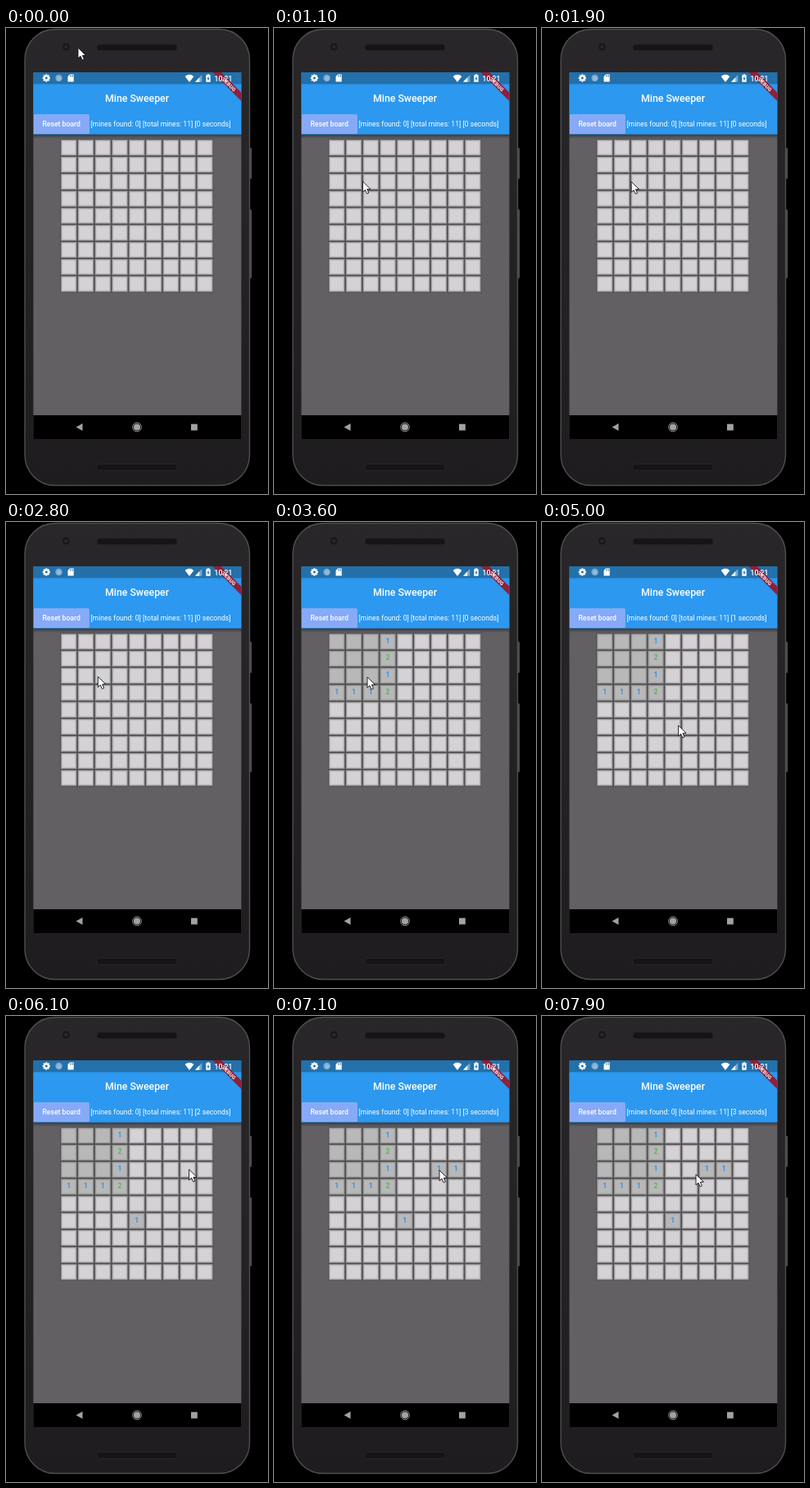
These frames come from a looping animation (320x568 px, 8 s). An HTML page with a canvas:

```html
<!DOCTYPE html>
<html lang="en">
<head>
<meta charset="utf-8">
<title>Mine Sweeper</title>
<style>
  html, body { margin: 0; width: 320px; height: 568px; overflow: hidden; background: #000; }
  canvas { display: block; width: 320px; height: 568px; }
</style>
</head>
<body>
<canvas id="stage"></canvas>
<script>
const W = 320, H = 568, LOOP = 8000, STEP = 100;
const canvas = document.getElementById('stage');
const dpr = window.devicePixelRatio || 1;
canvas.width = W * dpr;
canvas.height = H * dpr;
const ctx = canvas.getContext('2d');
ctx.scale(dpr, dpr);

const SCREEN = { x: 33.4, y: 54, w: 254, h: 447 };
const GRID = { x: 67.1, y: 136.2, pitch: 20.78, size: 19.2, n: 9 };
const NUMBER_COLORS = { 1: '#3192e6', 2: '#4fba50' };
const GRAY = '#a3a2a3', STATUS_BLUE = '#2370ab';

const BOARD = [
  '....*....',
  '.......*.',
  '....*....',
  '.........',
  '.*..*....',
  '........*',
  '......*..',
  '..*......',
  '*....*..*'
];

// Opening clicks: time, column, row
const CLICKS = [[3200, 2, 2], [5100, 4, 5], [6300, 7, 2], [6700, 6, 2]];
const TICK = 1300;

// Pointer moves: from time, to time, end x, end y
const START = [88, 24];
const MOVES = [
  [0, 900, 108.4, 187], [1400, 3600, 114, 189], [4100, 4600, 166.6, 248],
  [5100, 5900, 223.6, 187], [6300, 6700, 202, 188], [7100, 7500, 188, 193]
];

function neighbours(c, r) {
  const list = [];
  for (let y = r - 1; y <= r + 1; y++)
    for (let x = c - 1; x <= c + 1; x++)
      if (BOARD[y]?.[x] && (x !== c || y !== r)) list.push([x, y]);
  return list;
}

function reveal(open, c, r) {
  const key = r * GRID.n + c;
  if (key in open) return;
  const around = neighbours(c, r);
  open[key] = around.filter(([x, y]) => BOARD[y][x] === '*').length;
  if (!open[key]) around.forEach(([x, y]) => reveal(open, x, y));
}

function box(x, y, w, h, fill) {
  ctx.fillStyle = fill;
  ctx.fillRect(x, y, w, h);
}

function inset(x, y, size, by, fill) {
  box(x + by, y + by, size - 2 * by, size - 2 * by, fill);
}

function round(x, y, w, h, r, fill, stroke, width = 1) {
  ctx.beginPath();
  ctx.roundRect(x, y, w, h, r);
  if (fill) { ctx.fillStyle = fill; ctx.fill(); }
  if (stroke) { ctx.strokeStyle = stroke; ctx.lineWidth = width; ctx.stroke(); }
}

function poly(points, fill) {
  ctx.beginPath();
  points.forEach(([x, y]) => ctx.lineTo(x, y));
  ctx.closePath();
  ctx.fillStyle = fill;
  ctx.fill();
}

function disc(x, y, r, fill) {
  ctx.beginPath();
  ctx.arc(x, y, r, 0, Math.PI * 2);
  ctx.fillStyle = fill;
  ctx.fill();
}

function fade(y0, y1, from, to) {
  const g = ctx.createLinearGradient(0, y0, 0, y1);
  g.addColorStop(0, from);
  g.addColorStop(1, to);
  return g;
}

function text(str, x, y, size, weight, fill, align = 'left') {
  ctx.font = `${weight} ${size}px Roboto, "Liberation Sans", sans-serif`;
  ctx.textAlign = align;
  ctx.fillStyle = fill;
  ctx.fillText(str, x, y);
}

function drawPhone() {
  box(0, 0, W, H, '#000');
  round(296, 146, 4.2, 38, 1.5, '#4b4a4b');
  round(296, 221, 4.2, 84, 1.5, '#4b4a4b');
  round(23, 1.5, 274.5, 556, 37, fade(0, H, '#292729', '#1f1c1f'), '#504e50', 1.4);
  for (const y of [19.8, 531.5]) {
    round(111, y, 98, 8, 3, '#161416', '#2b292b', 0.8);
  }
  disc(73.3, 23, 4.5, '#1a181a');
  disc(73.3, 23, 2, '#2c2b2e');
}

function drawGear(x, y) {
  ctx.save();
  ctx.translate(x, y);
  for (let i = 0; i < 4; i++) {
    box(-1.1, -4.6, 2.2, 9.2, '#fff');
    ctx.rotate(Math.PI / 4);
  }
  disc(0, 0, 3.4, '#fff');
  disc(0, 0, 1.5, STATUS_BLUE);
  ctx.restore();
}

function drawStatus() {
  drawGear(49.3, 61);
  disc(64.5, 61, 4.2, '#78aad2');
  disc(65, 61.4, 2.7, '#94b9d6');
  poly([[75.5, 59], [78, 56.5], [82.7, 56.5], [82.7, 65.5], [75.5, 65.5]], '#fff');
  for (let i = 0; i < 3; i++) box(78 + i * 1.6, 57.5, 0.8, 2, STATUS_BLUE);
  // Wi-Fi, signal, battery
  ctx.beginPath();
  ctx.moveTo(224, 66);
  ctx.lineTo(218.6, 59);
  ctx.quadraticCurveTo(224, 54.6, 229.4, 59);
  ctx.fillStyle = '#fff';
  ctx.fill();
  poly([[231, 65.7], [239.3, 57], [239.3, 65.7]], '#79a9ce');
  poly([[231, 65.7], [236.2, 60.3], [236.2, 65.7]], '#fff');
  box(244.3, 57.3, 5.4, 8.5, '#fff');
  box(245.8, 56.3, 2.4, 1.2, '#fff');
  poly([[247.5, 58.5], [245.4, 62.2], [246.7, 62.2], [246.5, 64.8], [248.7, 61.2], [247.4, 61.2]], STATUS_BLUE);
  text('10:21', 254.5, 64.6, 8.6, 500, '#fff');
}

function drawRibbon() {
  ctx.save();
  ctx.beginPath();
  ctx.rect(SCREEN.x, SCREEN.y, SCREEN.w, SCREEN.h);
  ctx.clip();
  ctx.translate(SCREEN.x + SCREEN.w, SCREEN.y);
  ctx.rotate(Math.PI / 4);
  box(-30, 17.4, 60, 7.4, '#8c213b');
  text('DEBUG', 0, 23.4, 6.3, 900, '#efe2e6', 'center');
  ctx.restore();
}

function drawNav() {
  box(SCREEN.x, 472, SCREEN.w, 29, '#000');
  poly([[85.5, 486.5], [93.5, 482], [93.5, 491]], GRAY);
  disc(160, 486.5, 4.1, GRAY);
  round(154.6, 481.1, 10.8, 10.8, 5.4, null, GRAY, 0.9);
  box(226, 482.7, 7.8, 7.8, GRAY);
}

function drawCell(c, r, value) {
  const { pitch, size } = GRID;
  const x = GRID.x + c * pitch, y = GRID.y + r * pitch;
  const open = value !== undefined;
  inset(x, y, size, -0.8, '#4c4a4c');
  inset(x, y, size, 0, open ? '#929192' : '#9b9a9c');
  inset(x, y, size, 1, open ? '#aeadae' : '#c2c1c3');
  inset(x, y, size, 2, open ? '#b9b8b9' : '#d4d2d5');
  if (value) text(value, x + size / 2, y + 11.5, 8.6, 700, NUMBER_COLORS[value], 'center');
}

function drawBoard(t) {
  const open = {};
  for (const [at, c, r] of CLICKS) if (t >= at) reveal(open, c, r);
  for (let r = 0; r < GRID.n; r++)
    for (let c = 0; c < GRID.n; c++) drawCell(c, r, open[r * GRID.n + c]);
}

function drawApp(t) {
  const { x, y, w, h } = SCREEN;
  box(x, y, w, h, '#626062');
  box(x, 129, w, 6, fade(129, 135, 'rgba(0,0,0,.45)', 'rgba(0,0,0,0)'));
  box(x, 68, w, 61.7, '#2c98ef');
  box(x, y, w, 14.4, STATUS_BLUE);
  text('Mine Sweeper', 160, 90.3, 12.3, 500, '#fff', 'center');

  box(34, 105.5, 67.5, 23.3, '#86a9f8');
  round(34.5, 106, 66.5, 22.3, 0, null, '#8fb0ee');
  text('Reset board', 67.6, 120, 8.65, 500, '#fff', 'center');
  const seconds = Math.max(0, Math.floor((t - CLICKS[0][0]) / TICK));
  text(`[mines found: 0] [total mines: 11] [${seconds} seconds]`, 103.3, 120, 8.64, 400, '#fff');

  drawBoard(t);
  drawNav();
  drawRibbon();
  drawStatus();
}

function pointerAt(t) {
  let [x, y] = START;
  for (const [from, to, tx, ty] of MOVES) {
    const u = Math.min(1, Math.max(0, (t - from) / (to - from)));
    const e = u * u * (3 - 2 * u);
    x += (tx - x) * e;
    y += (ty - y) * e;
  }
  return [x, y];
}

function drawPointer(t) {
  const [x, y] = pointerAt(t);
  const shape = [[0, 0], [0, 13], [3, 10.3], [5.1, 15], [7.4, 14], [5.3, 9.5], [9.4, 9.3]];
  poly(shape.map(([dx, dy]) => [x + dx, y + dy]), '#fff');
  ctx.strokeStyle = '#111';
  ctx.lineWidth = 0.9;
  ctx.stroke();
}

function frame(now) {
  const t = Math.floor((now % LOOP) / STEP) * STEP;
  drawPhone();
  drawApp(t);
  drawPointer(t);
}

let start;
function loop(now) {
  start ??= now;
  frame(now - start);
  requestAnimationFrame(loop);
}
frame(0);
requestAnimationFrame(loop);
</script>
</body>
</html>
```
